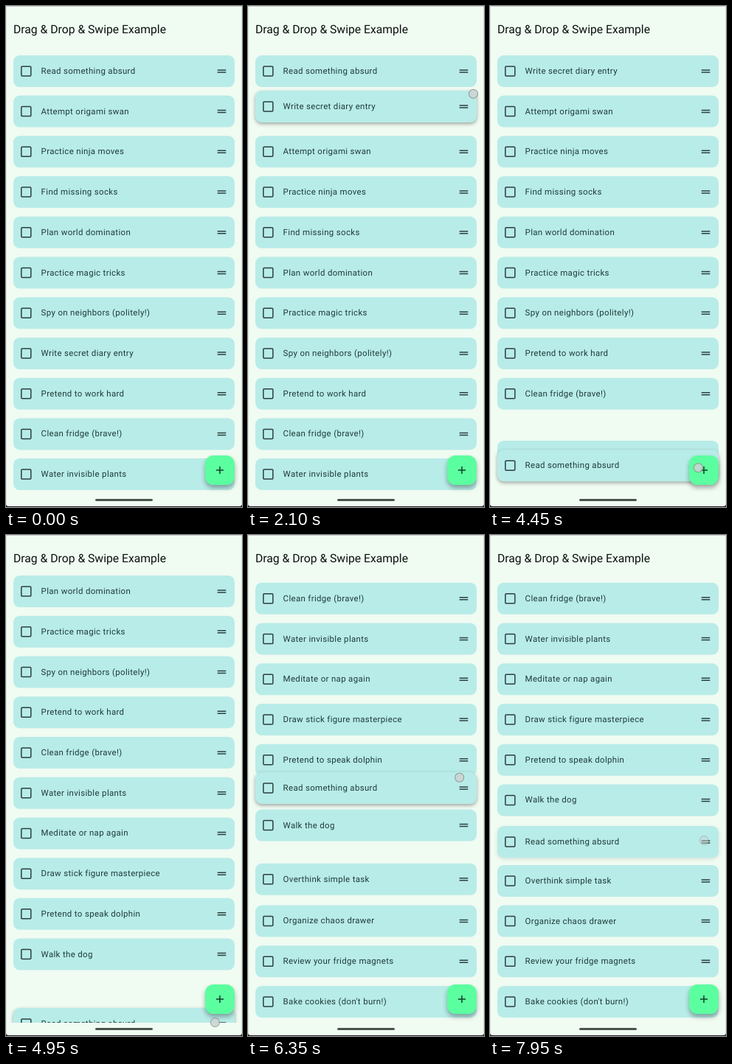
Recreate the animation shown at these times as an HTML page. Size 320 by 680 pixels, loop 8 s.

```html
<!DOCTYPE html>
<html lang="en">
<head>
<meta charset="utf-8">
<title>Reorderable list</title>
<style>
  html, body { margin: 0; width: 100%; height: 100%; overflow: hidden; background: #222; }
  #stage {
    position: relative; width: 320px; height: 680px; overflow: hidden;
    font-family: Roboto, sans-serif; text-rendering: geometricPrecision;
  }
  #screen { position: absolute; inset: 0 0 1px; background: #f0fbf2; border-radius: 0 0 4px 4px; }
  #screen::after {
    content: ""; position: absolute; inset: 0; border-radius: inherit;
    box-shadow: inset 0 1px #c4cdc6, inset 1px 0 #dfe8e1, inset -1px 0 #dfe8e1;
  }
  h1 {
    position: absolute; left: 10px; top: 21.7px; margin: 0;
    font-size: 15.71px; font-weight: 400; line-height: 20px; color: #0c1210; white-space: nowrap;
  }
  #list { position: absolute; z-index: 0; left: 0; top: 55px; width: 320px; height: 607px; overflow: hidden; }
  .card {
    position: absolute; left: 10px; top: -76.5px; width: 300px; height: 43px;
    border-radius: 8.57px; background: #b8ece8; color: #1e3b3a;
    font-size: 11.43px; letter-spacing: .357px; line-height: 43px; white-space: nowrap;
  }
  .card span { position: absolute; left: 37.6px; }
  svg { position: absolute; left: 0; top: 0; fill: none; stroke-width: 1.5; }
  .card svg { stroke: #2c403f; }
  #fab {
    position: absolute; z-index: 1; left: 270px; top: 610px; width: 40px; height: 40px;
    border-radius: 11.4px; background: #5cff9f; box-shadow: 0 4px 6px rgba(0, 0, 0, .32);
  }
  #fab svg { stroke: #10402a; }
  #nav {
    position: absolute; z-index: 1; left: 121px; top: 669px; width: 78px; height: 3px;
    border-radius: 1.5px; background: #4b524e;
  }
  #finger {
    position: absolute; z-index: 2; left: -6.5px; top: -6.5px; width: 11px; height: 11px;
    border: 1px solid rgba(125, 135, 133, .75); border-radius: 50%;
    background: rgba(204, 212, 210, .85);
  }
</style>
</head>
<body>
<div id="stage">
  <div id="screen">
    <h1>Drag &amp; Drop &amp; Swipe Example</h1>
    <div id="list"></div>
    <div id="fab"><svg width="40" height="40"><path d="M15 20h10M20 15v10"/></svg></div>
    <div id="nav"></div>
    <div id="finger"></div>
  </div>
</div>
<script>
const LOOP = 8000, FIRST = 87.9, PITCH = 54.72, REACH = 21.5, EDGE_REACH = 12;
const SCROLL = { start: 4500, speed: 0.5115, max: 439.8 };
const FINGER_LEAD = 32; // ms the finger runs ahead of the card

const labels = [
  'Read something absurd', 'Attempt origami swan', 'Practice ninja moves', 'Find missing socks',
  'Plan world domination', 'Practice magic tricks', 'Spy on neighbors (politely!)',
  'Write secret diary entry', 'Pretend to work hard', 'Clean fridge (brave!)',
  'Water invisible plants', 'Meditate or nap again', 'Draw stick figure masterpiece',
  'Pretend to speak dolphin', 'Walk the dog', 'Overthink simple task',
  'Organize chaos drawer', 'Review your fridge magnets', "Bake cookies (don't burn!)"
];

// path: [time, centre of the held card]; x: finger from and to; grip: finger above the card centre
const drags = [
  { item: 7, start: 400, end: 2750, x: [305, 305], grip: 15,
    path: [[600, 471], [1850, 150], [2100, 136], [2600, 88]] },
  { item: 0, start: 3200, end: 8000, x: [279, 290], grip: 2,
    path: [[3400, 142.6], [4150, 577], [4450, 623], [4700, 663], [5200, 663], [5450, 600],
           [5750, 557], [6800, 240], [7050, 259], [7700, 424], [7950, 416]] }
];

const clamp = (v, lo, hi) => Math.min(hi, Math.max(lo, v));

// Smooth interpolation that never overshoots its points
function curve(points, t) {
  const last = points.length - 1;
  if (t <= points[0][0]) return points[0][1];
  if (t >= points[last][0]) return points[last][1];
  const slope = k => (points[k + 1][1] - points[k][1]) / (points[k + 1][0] - points[k][0]);
  const tangent = k => {
    if (k === 0 || k === last) return 0;
    const a = slope(k - 1), b = slope(k);
    return a * b <= 0 ? 0 : 2 * a * b / (a + b);
  };
  const k = points.findIndex(p => p[0] > t) - 1;
  const span = points[k + 1][0] - points[k][0], u = (t - points[k][0]) / span, v = 1 - u;
  return points[k][1] * v * v * (1 + 2 * u) + points[k + 1][1] * u * u * (3 - 2 * u)
    + span * u * v * (tangent(k) * v - tangent(k + 1) * u);
}

const scrollAt = t => clamp((t - SCROLL.start) * SCROLL.speed, 0, SCROLL.max);
const isScrolling = t => scrollAt(t) > 0 && scrollAt(t) < SCROLL.max;
const dragAt = t => drags.find(d => t >= d.start && t < d.end);
const slotY = (slot, t) => FIRST + slot * PITCH - scrollAt(t);

// Walk through the drags once and note when each card changes places
function findMoves() {
  const order = labels.map((_, i) => i), moves = labels.map(() => []);
  for (let t = 0; t < LOOP; t += 2) {
    const drag = dragAt(t);
    if (!drag) continue;
    const y = curve(drag.path, t), slot = order.indexOf(drag.item);
    const instant = isScrolling(t), reach = instant ? EDGE_REACH : REACH;
    let step = 0;
    if (slot < order.length - 1 && y > slotY(slot + 1, t) - reach) step = 1;
    else if (slot > 0 && y < slotY(slot - 1, t) + reach) step = -1;
    if (!step) continue;
    const other = order[slot + step];
    order[slot] = other;
    order[slot + step] = drag.item;
    moves[other].push({ t, step: -step, instant });
    moves[drag.item].push({ t, step, instant: true });
  }
  return moves;
}

const moves = findMoves();

// Critically damped spring from 0 to 1
function settle(ms) {
  const u = ms / 45;
  return 1 - (1 + u) * Math.exp(-u);
}

function restingY(item, t) {
  let slot = item;
  for (const m of moves[item])
    if (t >= m.t) slot += m.step * (m.instant ? 1 : settle(t - m.t));
  return slotY(slot, t);
}

const list = document.getElementById('list');
const finger = document.getElementById('finger');
const cards = labels.map(label => {
  const card = document.createElement('div');
  card.className = 'card';
  card.innerHTML = `<svg width="300" height="43">
    <rect x="10.8" y="15" width="13" height="13" rx="1.2"/><path d="M276.7 20h11.6m-11.6 3h11.6"/>
    </svg><span></span>`;
  card.querySelector('span').textContent = label;
  list.append(card);
  return card;
});

function drawFinger(drag, t) {
  finger.style.opacity = drag ? clamp(Math.min(t - drag.start, drag.end - t) / 90, 0, 1) : 0;
  if (!drag) return;
  const [from, to] = drag.x;
  const x = from + (to - from) * (t - drag.start) / (drag.end - drag.start);
  const y = curve(drag.path, t);
  const lead = (y - curve(drag.path, t - 1)) * FINGER_LEAD;
  finger.style.transform = `translate(${x.toFixed(2)}px, ${(y - drag.grip + lead).toFixed(2)}px)`;
}

function draw(t) {
  const drag = dragAt(t);
  cards.forEach((card, i) => {
    const held = drag && drag.item === i;
    const y = held ? curve(drag.path, t) : restingY(i, t);
    const lift = held ? clamp(Math.min(t - drag.start, drag.end - t) / 150, 0, 1) : 0;
    card.style.transform = `translateY(${y.toFixed(2)}px)`;
    card.style.zIndex = held ? 1 : 0;
    card.style.boxShadow = lift ? `0 2px 5px rgba(0,0,0,${0.35 * lift})` : 'none';
  });
  drawFinger(drag, t);
}

const began = performance.now();
function tick() {
  draw((performance.now() - began) % LOOP);
  requestAnimationFrame(tick);
}
tick();
</script>
</body>
</html>
```
